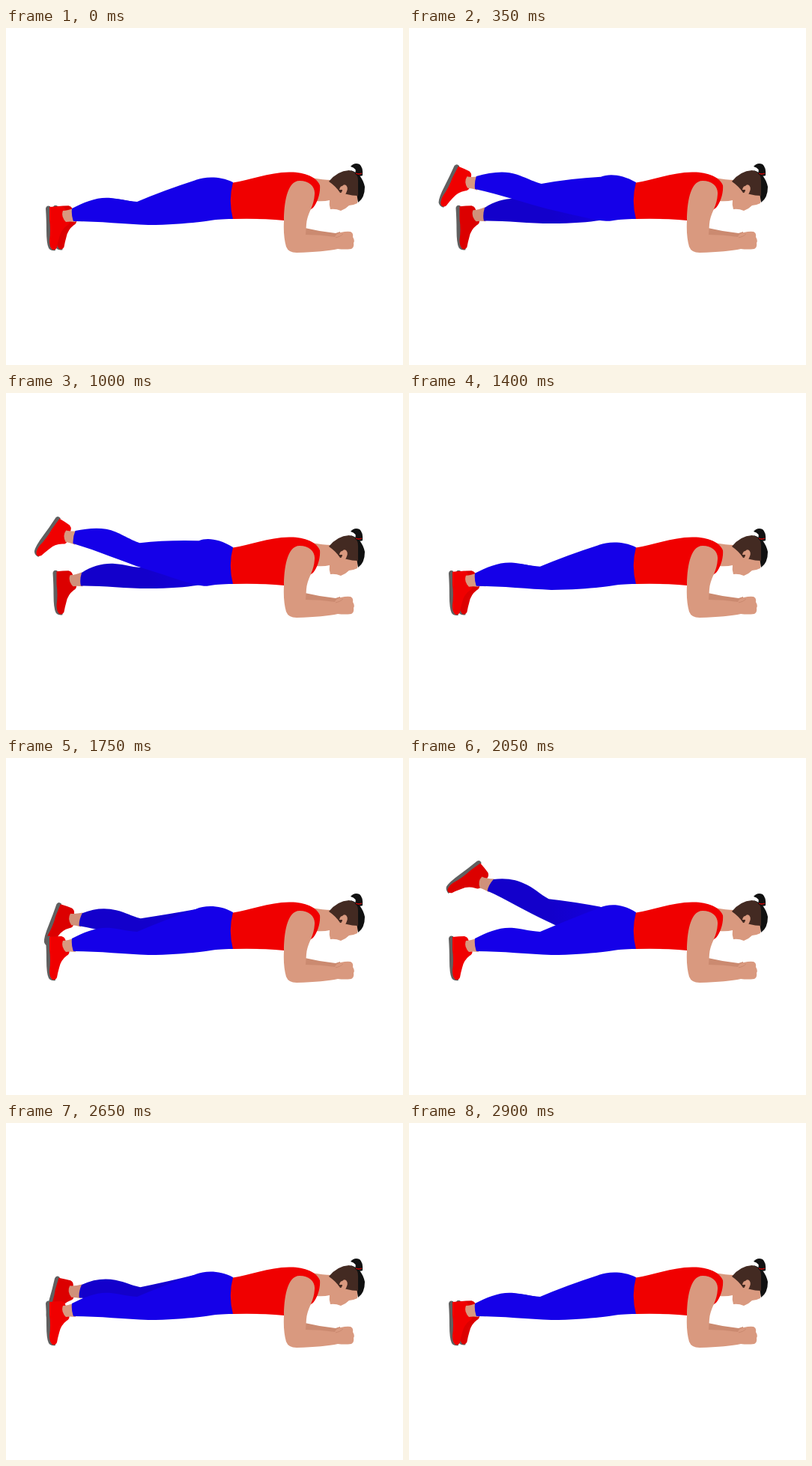
An HTML page for the animation above (2.95 s loop, 530 px wide and 450 px high).

```html
<!DOCTYPE html>
<html lang="en">
<head>
<meta charset="utf-8">
<title>Plank leg raise</title>
<style>
  html, body { margin: 0; width: 100%; height: 100%; overflow: hidden; background: #fff; }
  svg { display: block; width: 530px; height: 450px; }
</style>
</head>
<body>
<svg viewBox="0 0 530 450">
  <defs>
    <linearGradient id="shade" gradientUnits="userSpaceOnUse" x1="190" y1="0" x2="275" y2="0">
      <stop offset="0" stop-color="#1300cb"/>
      <stop offset="1" stop-color="#1500e0"/>
    </linearGradient>
    <g id="shoe">
      <path fill="#606060" d="M59 238 Q54 236 53 241 Q54 256 54 270 Q54 288 57 294 Q60 298 66 297 Z"/>
      <path d="M58 239 Q67 238 74 238 Q78 239 79 242 L84 256 Q86 261 81 264 Q73 270 71 280 Q69 287 68 293 Q66 297 62 296 Q58 293 58 284 Q60 270 58 256 Z"/>
    </g>
    <path id="ankle" d="M76 244 Q82 244 92 240 L93 259 Q85 258 80 259 Q73 252 76 244 Z"/>
  </defs>

  <g id="far">
    <use class="foot" href="#shoe" fill="#dc0000"/>
    <use class="skin" href="#ankle" fill="#d0917a"/>
    <path class="pants" fill="url(#shade)"/>
  </g>
  <g id="near">
    <use class="foot" href="#shoe" fill="#f00000"/>
    <use class="skin" href="#ankle" fill="#d9997f"/>
    <path class="pants" fill="#1500e8"/>
  </g>

  <!-- neck and face -->
  <path fill="#d9997f" d="M408 200 Q424 203 434 203 L452 200 L470 222 Q470 228 469 234 Q463 237 458 237 Q453 242 447 244 Q440 241 433 242 Q431 236 432 230 Q424 232 414 231 Z"/>
  <!-- hair -->
  <path fill="#111" d="M460 190 Q475 194 479 212 Q479 227 470 233 L465 200 Z"/>
  <path fill="#432a22" d="M431 205 Q442 191 458 190 Q470 192 470 204 L470 224 Q462 224 455 222 L446 220 Q440 211 431 205 Z"/>
  <path fill="#d9997f" d="M445 216 Q446 211 449 211 Q451 208 454 210 Q457 213 455 218 Q453 224 449 225 L444 222 Q449 220 449 216 Z"/>
  <path fill="#111" d="M460 185 Q465 179 472 182 Q477 186 476 197 Q471 199 466 195 Q469 187 460 185 Z"/>
  <path fill="none" stroke="#e00000" stroke-width="1.3" d="M467 194 Q471 196 475 194"/>

  <!-- shirt -->
  <path fill="#f00000" d="M303 206.500 C325 203 350 193 378 192.500 C398 192 415 199 419 210 C420 220 416 233 410 240 L385 257 L371 257 Q340 254 303 255 Q296.500 230 303 206.500 Z"/>

  <!-- arms -->
  <path fill="#cb8a70" d="M399 267 Q420 272 440 274 L446 272 L446 284 L399 280 Z"/>
  <path fill="#d9997f" d="M392 204 C405 204 413 212 412 222 C411 240 402 247 401 262 L400 276 Q420 276 439 279 Q441 274 447 273 Q455 271 460 272 Q464 274 463 279 Q466 284 464 287 Q465 293 461 295 Q452 296 443 295 Q425 299 388 300 Q377 300 374 292 Q370 278 371 258 C371 238 374 204 392 204 Z"/>
  <path fill="none" stroke="#cb8a70" stroke-width="1" d="M440 280 Q446 279 450 275"/>
</svg>
<script>
  const LOOP = 2950, STEP = 50, FOOT_TURN = 2.2;
  const HIP = [285, 228], ANKLE = [82, 250];

  function turn([x, y], deg) {
    const a = deg * Math.PI / 180, c = Math.cos(a), s = Math.sin(a);
    const dx = x - HIP[0], dy = y - HIP[1];
    return [HIP[0] + dx * c - dy * s, HIP[1] + dx * s + dy * c];
  }

  // Leg points turn with the hip, the seat follows either leg part way, the waist stays.
  function nearPants(a, other) {
    const p = (x, y) => turn([x, y], a);
    const h = turn([252, 203.5], a * 0.7 + other * 0.3);
    const seat = 196.5 - 0.13 * (a + other);
    return `M${p(88, 241)} C${p(105, 232)} ${p(123, 225)} ${p(140, 227)}
      S${p(160, 231)} ${p(175, 232)} Q${p(210, 217)} ${h}
      C${h[0] + 10},${h[1] - 4.5} 284,${seat} 303,206 L303,255
      C288,255 278,256 270,257.5 C255,259.5 ${p(225, 263)} ${p(190, 263)}
      C${p(160, 262)} ${p(125, 258)} ${p(90, 258)} Q${p(87, 250)} ${p(88, 241)} Z`;
  }

  function farPants(a) {
    const p = (x, y) => turn([x, y], a);
    return `M${p(101, 240)} C${p(115, 231)} ${p(130, 227)} ${p(145, 228)}
      S${p(165, 232)} ${p(179, 233)} Q${p(212, 222)} ${turn([255, 203], a * 0.3)}
      L300,209 L300,253 C285,254 275,254 266,255
      C250,258 ${p(225, 261)} ${p(190, 261)}
      C${p(160, 261)} ${p(125, 257)} ${p(100, 257.5)} Q${p(98, 250)} ${p(101, 240)} Z`;
  }

  function makeLeg(id, pants, shift) {
    const part = name => document.querySelector(`#${id} .${name}`);
    const foot = part("foot"), skin = part("skin"), cloth = part("pants");
    const pivot = [ANKLE[0] + shift[0], ANKLE[1] + shift[1]];
    return (a, other) => {
      const [x, y] = turn(pivot, a);
      const place = deg =>
        `translate(${x} ${y}) rotate(${deg}) translate(${-ANKLE[0]} ${-ANKLE[1]})`;
      foot.setAttribute("transform", place(FOOT_TURN * a));
      skin.setAttribute("transform", place(a));
      cloth.setAttribute("d", pants(a, other));
    };
  }

  // Smooth rise and fall around a peak time
  function raise(t, peak, half, lift) {
    const u = (t - peak) / half;
    return Math.abs(u) < 1 ? lift * (1 + Math.cos(Math.PI * u)) / 2 : 0;
  }

  const near = makeLeg("near", nearPants, [0, 0]);
  const far = makeLeg("far", farPants, [9.5, -0.7]);

  function draw() {
    const t = Math.floor(performance.now() % LOOP / STEP) * STEP;
    const a = raise(t, 712, 712, 25.7), b = raise(t, 2174, 739, 26.5);
    near(a, b);
    far(b, a);
    requestAnimationFrame(draw);
  }
  draw();
</script>
</body>
</html>
```
